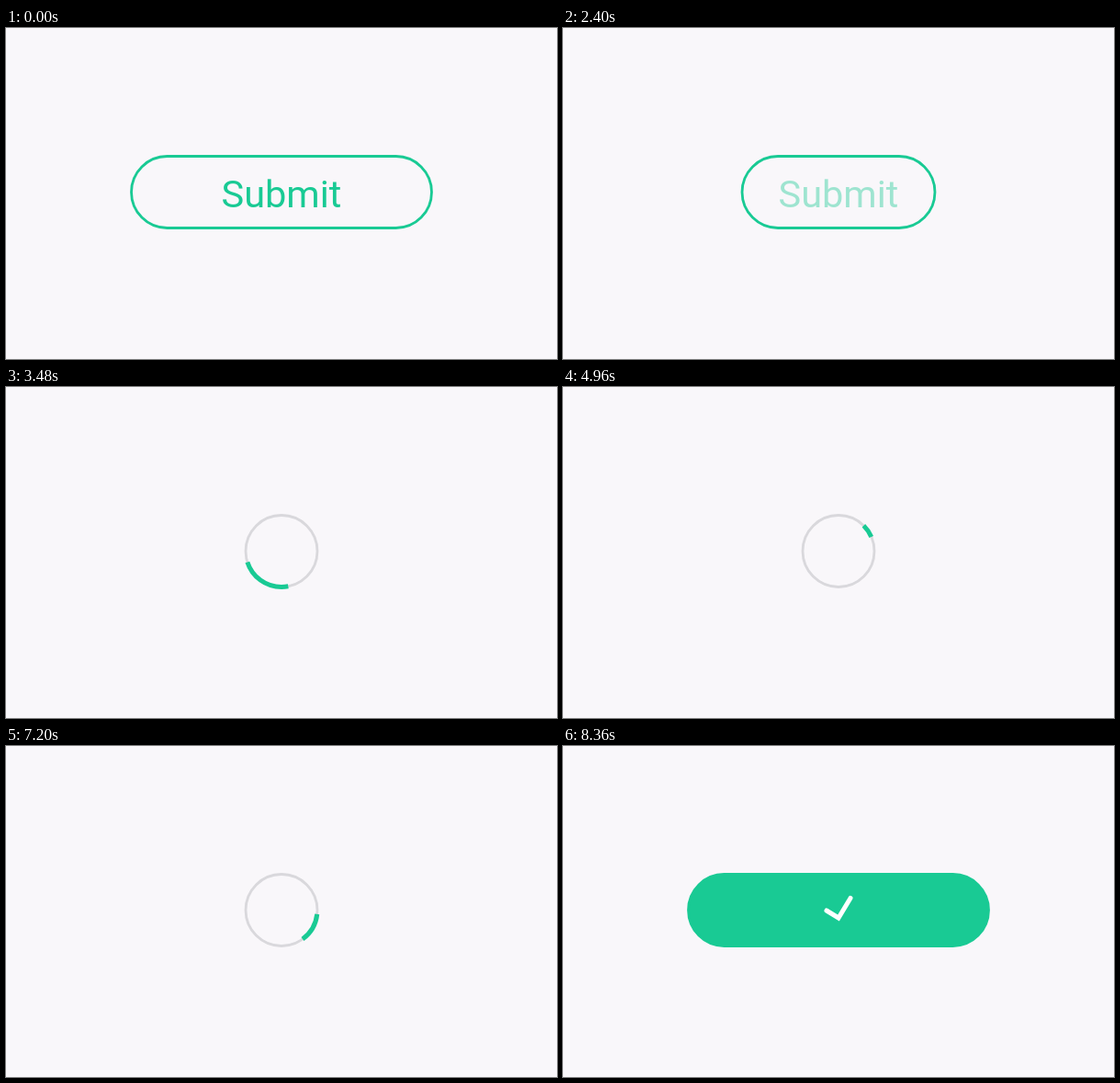
Recreate the animation shown at these times as an HTML page. Size 600 px wide and 360 px high, loop 8.4 s.

```html
<!DOCTYPE html>
<html lang="en">
<head>
<meta charset="utf-8">
<title>Submit button</title>
<style>
  html, body { margin: 0; width: 100%; height: 100%; overflow: hidden; background: #f9f7fa; }
  svg { display: block; }
  text { font: 400 41.5px Roboto, sans-serif; text-anchor: middle; fill: #19ca94; }
</style>
</head>
<body>
<svg width="600" height="360" viewBox="0 0 600 360">
  <rect id="pill" y="139.5" height="78" rx="39" stroke-width="2.8" fill="#19ca94"/>
  <circle id="arc" cx="300" cy="178.5" r="39" pathLength="360" fill="none"
          stroke="#19ca94" stroke-width="5" transform="rotate(-90 300 178.5)"/>
  <text id="label" x="300" y="195">Submit</text>
  <path id="check" d="M287 179 L300 187 L313 165.5" fill="none" stroke="#fff"
        stroke-width="5" stroke-linecap="round"/>
</svg>
<script>
const LOOP = 8400, STEP = 40;
const SPIN_START = 2520, SPIN_TIME = 2000, SPIN_END = 7360;
const GREEN = [25, 202, 148], GREY = [217, 216, 220];
const [pill, arc, label, check] =
  ['pill', 'arc', 'label', 'check'].map(id => document.getElementById(id));

const ramp = (t, a, b) => Math.min(1, Math.max(0, (t - a) / (b - a)));
const ease = x => x * x * (3 - 2 * x);
const mix = (a, b, p) => a + (b - a) * p;

function draw(t) {
  const shrink = ease(ramp(t, 2160, 2660));
  const grow = ease(ramp(t, 7350, 7520));
  const half = mix(163.5, 39, shrink - grow);
  const grey = ramp(t, 2440, 2640) * (1 - ramp(t, 7340, 7400));
  pill.setAttribute('x', 300 - half);
  pill.setAttribute('width', 2 * half);
  pill.setAttribute('stroke', `rgb(${GREEN.map((c, i) => mix(c, GREY[i], grey))})`);
  pill.setAttribute('fill-opacity', grow);
  label.setAttribute('opacity', 1 - ramp(t, 2160, 2560));
  check.setAttribute('opacity', grow);

  // The head outruns the tail, then waits at the top for it.
  const spin = Math.max(0, t - SPIN_START);
  const tail = 360 * ease(spin % SPIN_TIME / SPIN_TIME);
  const head = Math.min(360, 1.49 * tail);
  arc.setAttribute('visibility', t < SPIN_END && head > tail ? 'visible' : 'hidden');
  arc.setAttribute('stroke-dasharray', `0 ${tail} ${head - tail} 720`);
}

const start = performance.now();
function tick() {
  const t = Math.max(0, performance.now() - start) % LOOP;
  draw(Math.floor(t / STEP) * STEP);
  requestAnimationFrame(tick);
}
tick();
</script>
</body>
</html>
```
